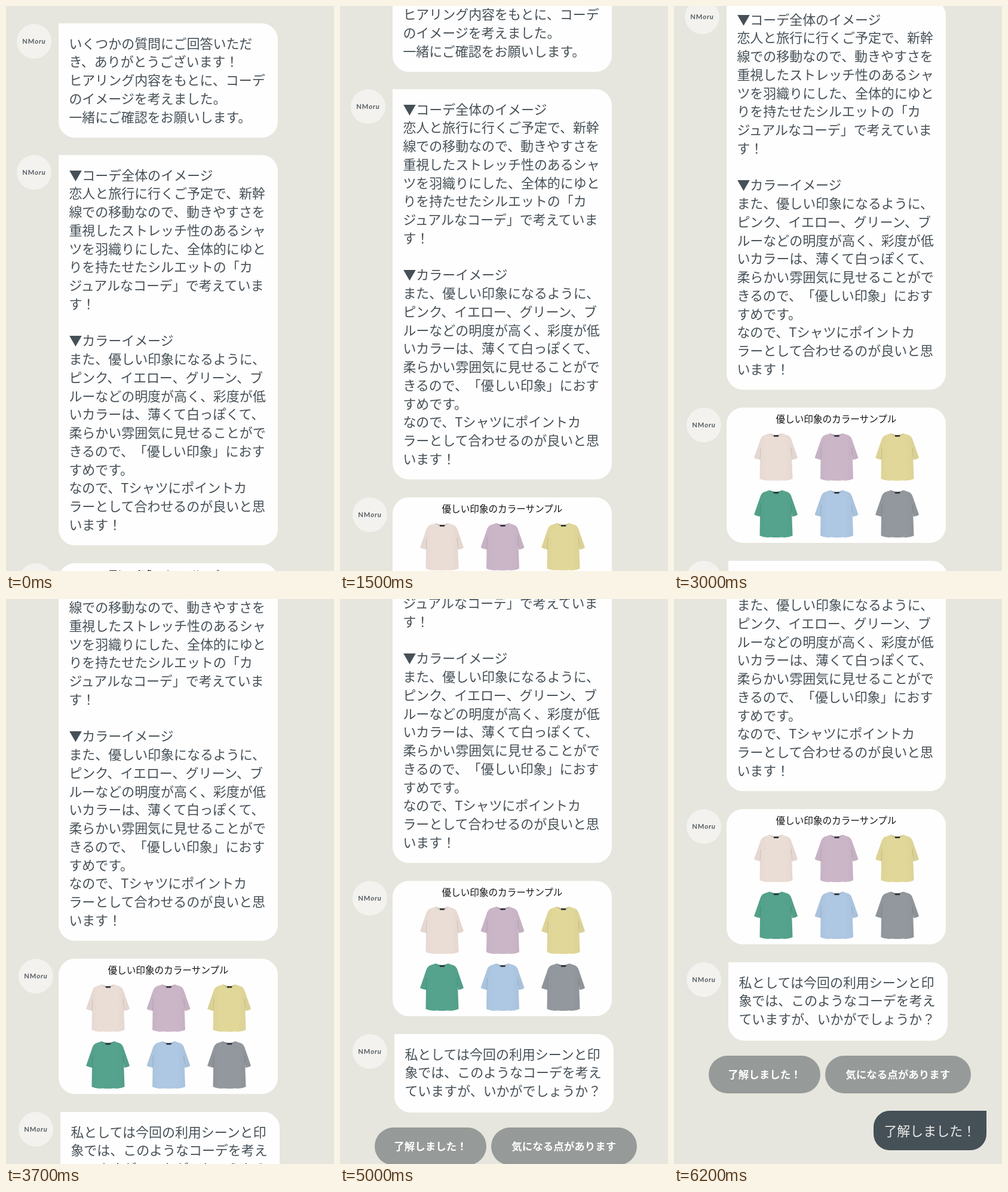
An HTML page for the animation above (8 s loop, 549 px wide and 944 px high).

```html
<!DOCTYPE html>
<html lang="ja">
<head>
<meta charset="utf-8">
<title>コーデ相談チャット</title>
<style>
  html, body { margin: 0; width: 100%; height: 100%; overflow: hidden; background: #e6e6de; }
  #stage { position: relative; width: 549px; height: 944px; overflow: hidden; }
  #chat {
    position: absolute; left: 0; top: 0; width: 549px; height: 1524px;
    font-family: "Noto Sans CJK JP", "Noto Sans CJK", sans-serif;
    color: #465057; text-spacing-trim: space-all;
  }
  #chat > * { position: absolute; box-sizing: border-box; }
  .msg {
    width: 367px; padding: 17.6px 0 0 17.4px; border-radius: 0 27px 27px 27px;
    background: #fefefe; font-size: 21.96px; line-height: 30.75px; white-space: pre;
  }
  .card { border-radius: 27px; padding: 0; }
  .card h2 {
    margin: 0; position: absolute; left: 82.5px; top: 8px;
    font-size: 15.6px; line-height: 20px; font-weight: 400; color: #151515;
  }
  .card svg { position: absolute; left: 0; top: 0; }
  .reply { width: 189px; border-radius: 27px 0 27px 27px; background: #465057; color: #eeeeea; }
  .avatar {
    width: 58px; height: 58px; border-radius: 50%; background: #f3f2ee;
    font: 700 11.3px/58px Lato, sans-serif; letter-spacing: .8px;
    text-align: center; color: #565d63;
  }
  .button {
    height: 63px; border-radius: 32px; background: #969a98; color: #fff;
    font-size: 17.5px; font-weight: 700; line-height: 61px; text-align: center; white-space: nowrap;
  }
</style>
</head>
<body>
<div id="stage">
  <div id="chat">
    <div class="avatar" style="left:18px;top:29.5px">NM<i>oru</i></div>
    <div class="msg" style="left:88px;top:29px;height:190.5px">いくつかの質問にご回答いただ
き、ありがとうございます！
ヒアリング内容をもとに、コーデ
のイメージを考えました。
一緒にご確認をお願いします。</div>

    <div class="avatar" style="left:18px;top:249px">NM<i>oru</i></div>
    <div class="msg" style="left:88px;top:249px;height:652px">▼コーデ全体のイメージ
恋人と旅行に行くご予定で、新幹
線での移動なので、動きやすさを
重視したストレッチ性のあるシャ
ツを羽織りにした、全体的にゆと
りを持たせたシルエットの「カ
ジュアルなコーデ」で考えていま
す！

▼カラーイメージ
また、優しい印象になるように、
ピンク、イエロー、グリーン、ブ
ルーなどの明度が高く、彩度が低
いカラーは、薄くて白っぽくて、
柔らかい雰囲気に見せることがで
きるので、「優しい印象」におす
すめです。
なので、Tシャツにポイントカ
ラーとして合わせるのが良いと思
います！</div>

    <div class="avatar" style="left:21px;top:930.5px">NM<i>oru</i></div>
    <div class="msg card" style="left:88px;top:930.5px;height:226.5px"><h2>優しい印象のカラーサンプル</h2><svg id="shirts" width="367" height="226">
        <defs>
          <linearGradient id="shade">
            <stop offset="0" stop-opacity=".03"/>
            <stop offset=".3" stop-opacity="0"/>
            <stop offset=".7" stop-opacity="0"/>
            <stop offset="1" stop-opacity=".04"/>
          </linearGradient>
          <path id="cut" d="M26 0Q36.500 5 47 0L56 3Q61 5 63 12L73 41Q69 44 64 44L63 35L64.500 76Q56 80 46 78.500Q37 79.500 28 78.500Q18 80 9.500 76L10 44Q4 43 0 41L10 12Q12 5 17 3Z"/>
          <g id="detail">
            <use href="#cut" fill="url(#shade)"/>
            <path d="M26 0Q36.500 11 47 0M11 24L10 44M62 24L64 44" fill="none" stroke="#000" stroke-opacity=".13"/>
            <path d="M29 1Q36.500 5 44 1L43 3Q36.500 7 30 3Z" fill-opacity=".15"/>
            <rect x="33" y="3" width="8" height="2.600" fill="#2b2f36"/>
          </g>
        </defs>
      </svg></div>

    <div class="avatar" style="left:21px;top:1186.5px">NM<i>oru</i></div>
    <div class="msg" style="left:91px;top:1187px;height:131px">私としては今回の利用シーンと印
象では、このようなコーデを考え
ていますが、いかがでしょうか？</div>

    <div class="button" style="left:58px;top:1343px;width:187px">了解しました！</div>
    <div class="button" style="left:252.5px;top:1343px;width:244.5px">気になる点があります</div>
    <div class="msg reply" style="left:334px;top:1435px;height:66px">了解しました！</div>
  </div>
</div>
<script>
  const colors = ["#eaddd6", "#cbb6c8", "#e1d799", "#55a38d", "#aec7e2", "#92989d"];
  const svg = document.getElementById("shirts");

  function use(id, x, y, fill) {
    const el = document.createElementNS("http://www.w3.org/2000/svg", "use");
    el.setAttribute("href", id);
    el.setAttribute("x", x);
    el.setAttribute("y", y);
    if (fill) el.setAttribute("fill", fill);
    svg.append(el);
  }

  colors.forEach((color, i) => {
    const x = 46 + (i % 3) * 101.5;
    const y = 43 + Math.floor(i / 3) * 95;
    use("#cut", x, y, color);
    use("#detail", x, y);
  });

  // The chat scrolls 10px every 100ms, then rests.
  const LOOP = 8000, START = 500, STEPS = 58;
  const top0 = "translateY(0px)", end = `translateY(${-10 * STEPS}px)`;
  document.getElementById("chat").animate([
    { offset: 0, transform: top0 },
    { offset: START / LOOP, transform: top0, easing: `steps(${STEPS}, start)` },
    { offset: (START + STEPS * 100) / LOOP, transform: end },
    { offset: 1, transform: end }
  ], { duration: LOOP, iterations: Infinity });
</script>
</body>
</html>
```
